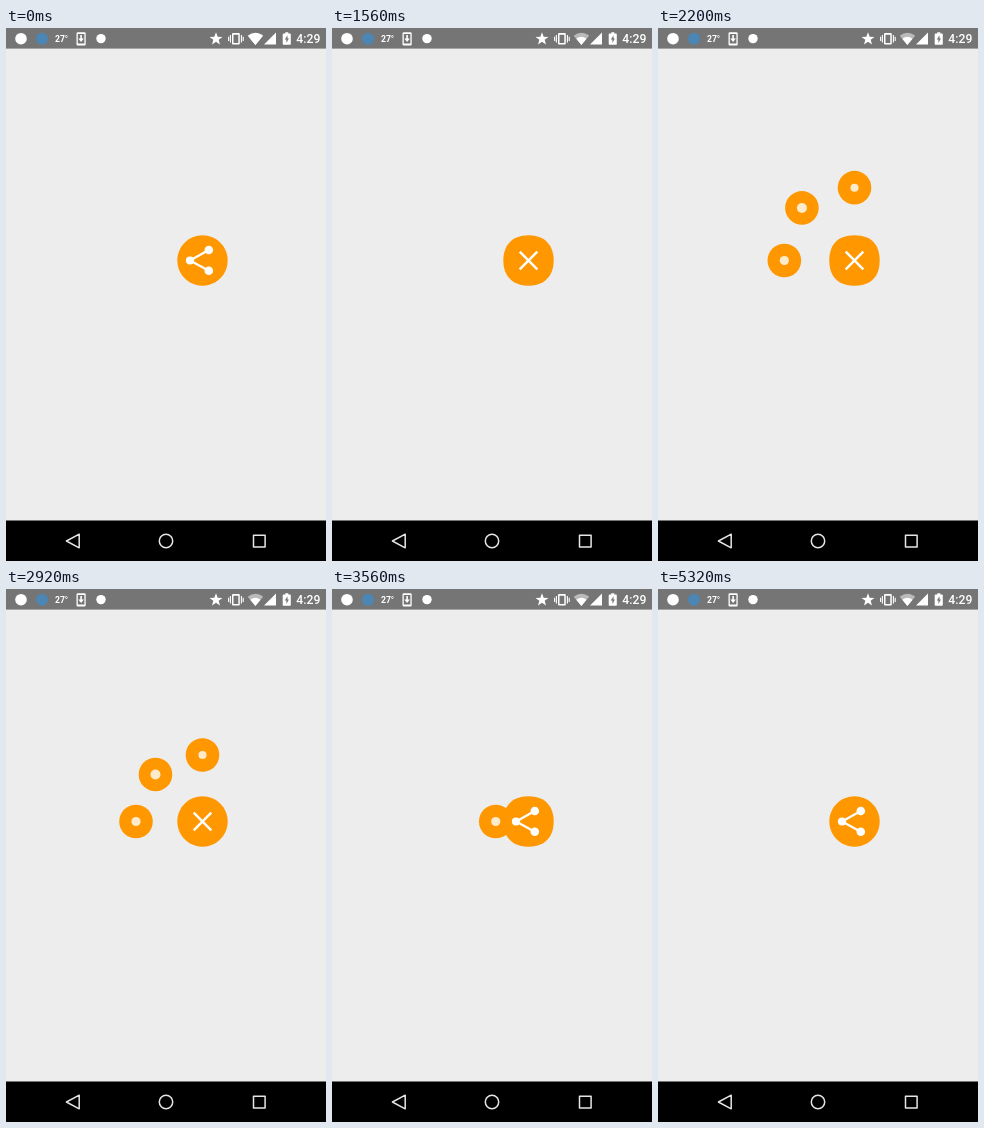
An HTML page for the animation above (5.36 s loop, 320x533 px).

```html
<!DOCTYPE html>
<html lang="en">
<head>
<meta charset="utf-8">
<title>Share menu</title>
<style>
html, body { margin: 0; width: 100%; height: 100%; overflow: hidden; background: #ededed; }
svg { display: block; width: 100vw; height: 100vh; }
text { fill: #fff; font-family: Roboto, "Noto Sans", sans-serif; }
</style>
</head>
<body>
<svg viewBox="0 0 320 533" preserveAspectRatio="none">
  <rect width="320" height="533" fill="#ededed"/>

  <g id="satellites"></g>
  <g transform="translate(196.5 232.5)">
    <path id="blob" fill="#ff9800"/>
    <g id="share" fill="#fff">
      <path d="M6.3-10.5L-12.5 0L6.3 10.2" fill="none" stroke="#fff" stroke-width="2.2"/>
      <circle cx="-12.5" cy="0" r="4.1"/>
      <circle cx="6.3" cy="-10.5" r="4.3"/>
      <circle cx="6.3" cy="10.2" r="4.3"/>
    </g>
    <path id="cross" d="M-8.8-8.8L8.8 8.8M8.8-8.8L-8.8 8.8" stroke="#fff" stroke-width="2.4"/>
  </g>

  <!-- status bar -->
  <rect width="320" height="20.6" fill="#757575"/>
  <g fill="#fff">
    <circle cx="15" cy="10.7" r="5.8"/>
    <circle cx="36" cy="10.7" r="6" fill="#4b86b4"/>
    <text x="49" y="14" font-size="8.6" font-weight="700">27°</text>
    <path d="M71.8 4.2h6.6a1.3 1.3 0 0 1 1.3 1.3v10.8a1.3 1.3 0 0 1-1.3 1.3h-6.6a1.3 1.3 0 0 1-1.3-1.3V5.500a1.3 1.3 0 0 1 1.3-1.3zM71.800 6v9.600h6.600V6z" fill-rule="evenodd"/>
    <path d="M74.300 7h1.600v3.500h2L75.100 14L72.300 10.500h2z"/>
    <circle cx="95" cy="10.600" r="4.700"/>
    <path id="star"/>
    <path d="M227 5h5.800a1 1 0 0 1 1 1v9.600a1 1 0 0 1-1 1H227a1 1 0 0 1-1-1V6a1 1 0 0 1 1-1zm.5 1.700v8.200h4.800V6.700z" fill-rule="evenodd"/>
    <path d="M224.400 7v7.500M222.600 8.700v4.200M235.400 7v7.500M237.200 8.700v4.200" stroke="#fff" stroke-width="1.1"/>
    <path id="wifi" d="M241.700 7.700Q249.400 1.800 257.100 7.700L249.400 17z"/>
    <path d="M244.300 10.700Q249.400 7 254.500 10.700L249.400 17z"/>
    <path d="M270 4.600V16.600H258z"/>
    <path d="M279.300 4.300h3v1.300h1.700a.8.800 0 0 1 .8.800v9.500a.8.800 0 0 1-.8.800h-6.500a.8.800 0 0 1-.8-.8V6.400a.8.800 0 0 1 .8-.8h1.800z"/>
    <path d="M281.500 7.200l-2.700 4.400h1.600v3.300l2.500-4.400h-1.400z" fill="#757575"/>
    <text x="290.300" y="15" font-size="12.2" font-weight="500">4:29</text>
  </g>

  <!-- navigation bar -->
  <rect y="492.500" width="320" height="40.500" fill="#000"/>
  <g fill="none" stroke="#e6e6e6" stroke-width="1.500" stroke-linejoin="round">
    <path d="M73.200 506.200V519.800L60.400 513z"/>
    <circle cx="160" cy="513" r="6.700"/>
    <rect x="247.500" y="507.300" width="11.600" height="11.600"/>
  </g>
</svg>
<script>
const LOOP = 5360, OPEN = 1413, CLOSE = 3000, WIFI_DROP = 1040;
const DUR = 800, STEP = DUR / 10, CYCLE = DUR / 4, SETTLE = 240;
const CX = 196.5, CY = 232.5, R = 25.2, GAP = 66.5, ROUND = 0.552;

const $ = id => document.getElementById(id);
const clamp = x => Math.min(1, Math.max(0, x));

// Buttons from the top one round to the left one
const items = [4, 5, 4.6].map((mark, i) => {
  const make = (r, fill) => {
    const c = document.createElementNS("http://www.w3.org/2000/svg", "circle");
    c.setAttribute("r", r);
    c.setAttribute("fill", fill);
    return c;
  };
  const g = document.createElementNS("http://www.w3.org/2000/svg", "g");
  g.append(make(16.8, "#ff9800"), make(mark, "#fdebcb"));
  $("satellites").append(g);
  return { g, angle: Math.PI / 2 + i * Math.PI / 4, show: (3 - i) * STEP, hide: i * STEP };
});

function anticipateOvershoot(x) {
  const s = 3, t = 2 * x;
  if (t < 1) return 0.5 * t * t * ((s + 1) * t - s);
  const u = t - 2;
  return 0.5 * (u * u * ((s + 1) * u + s) + 2);
}

// Handle length of the wobbling button: five linear sweeps, then back to a circle
function wobble(e) {
  if (e < 0 || e >= 5 * CYCLE + SETTLE) return ROUND;
  if (e < 5 * CYCLE) return ROUND - 0.02 + 0.22 * (e % CYCLE) / CYCLE;
  return ROUND + 0.2 * (1 - (e - 5 * CYCLE) / SETTLE);
}

function blobPath(k) {
  const c = k * R, b = ROUND * R;
  return `M0 ${R}C${c} ${R} ${R} ${b} ${R} 0S${c} ${-R} 0 ${-R}` +
    `S${-R} ${-b} ${-R} 0S${-c} ${R} 0 ${R}Z`;
}

function starPath() {
  const pts = [];
  for (let i = 0; i < 10; i++) {
    const r = i % 2 ? 2.8 : 6.8, a = i * Math.PI / 5;
    pts.push(`${210 + r * Math.sin(a)} ${11 - r * Math.cos(a)}`);
  }
  return `M${pts.join("L")}Z`;
}

function draw(t) {
  const closing = t >= CLOSE, open = t >= OPEN && !closing;
  for (const { g, angle, show, hide } of items) {
    const x = clamp((t - (closing ? CLOSE + hide : OPEN + show)) / DUR);
    const f = anticipateOvershoot(x);
    const d = GAP * (closing ? 1 - f : f);
    g.setAttribute("transform", `translate(${CX + d * Math.cos(angle)} ${CY - d * Math.sin(angle)})`);
    g.style.display = Math.abs(d) < 8.4 ? "none" : "";
  }
  $("blob").setAttribute("d", blobPath(wobble(t - (closing ? CLOSE : OPEN))));
  $("share").style.display = open ? "none" : "";
  $("cross").style.display = open ? "" : "none";
  $("wifi").setAttribute("fill-opacity", t < WIFI_DROP ? 1 : 0.5);
}

$("star").setAttribute("d", starPath());
const start = performance.now();
function tick() {
  draw((performance.now() - start) % LOOP);
  requestAnimationFrame(tick);
}
tick();
</script>
</body>
</html>
```
